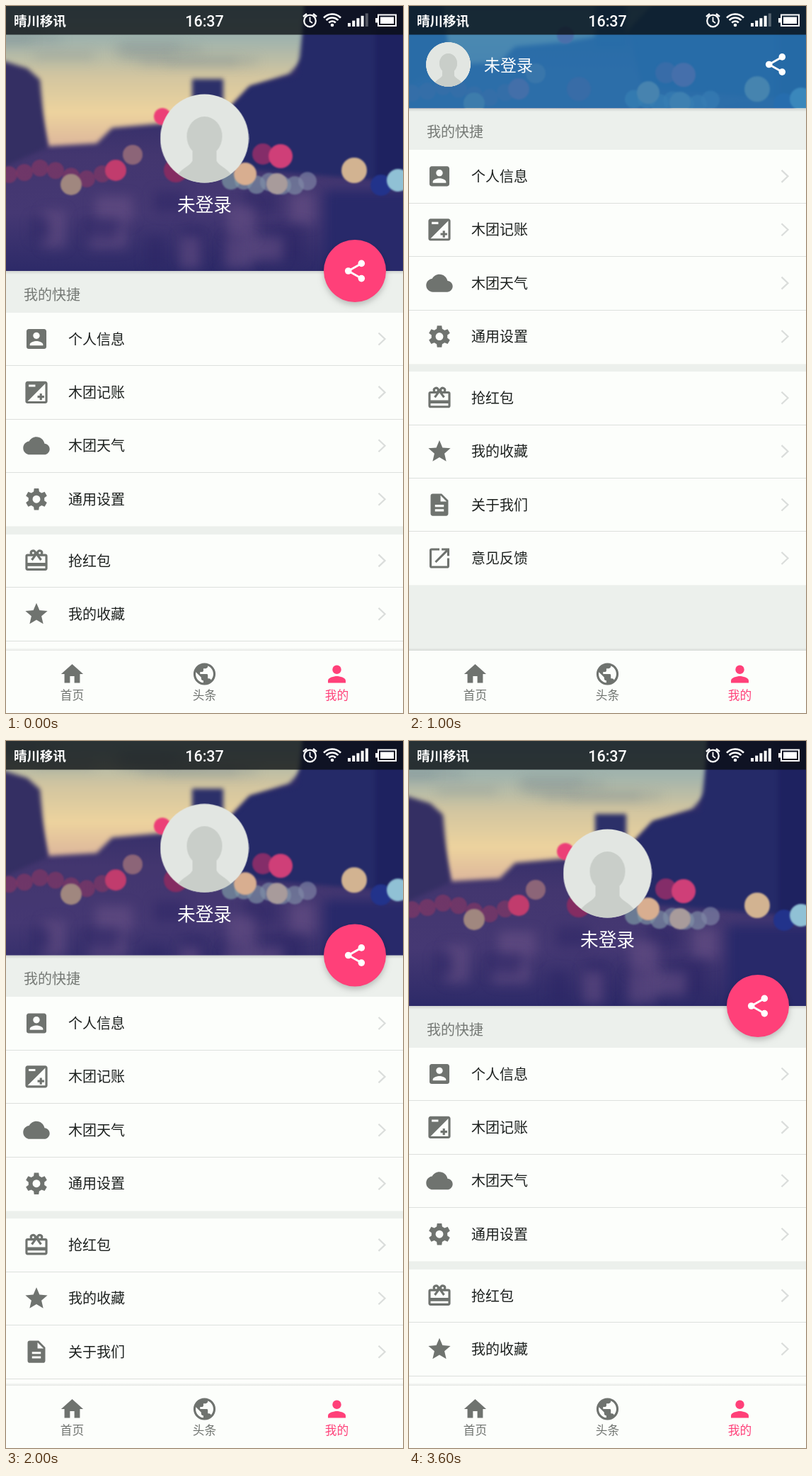
Write an HTML page with a canvas that moves like this. It is 561x998 px and loops after 3.7 s.

```html
<!DOCTYPE html>
<html lang="zh-CN">
<head>
<meta charset="utf-8">
<title>我的</title>
<style>
html, body { margin: 0; width: 100%; height: 100%; overflow: hidden; background: #ecf0ec; }
canvas { display: block; }
</style>
</head>
<body>
<canvas id="stage" width="561" height="998"></canvas>
<script>
const W = 561, FULL = 374, MIN = 126, TRIGGER = 212, LOOP = 3700, STEP = 100, TAU = Math.PI * 2;
const PINK = '#ff4079', GREY = '#6f736f', PAPER = '#fcfefb', BACK = '#ecf0ec';
const CJK = '"Noto Sans CJK SC", "Noto Sans CJK", sans-serif';
const ctx = document.getElementById('stage').getContext('2d');

const ICONS = {
  account: 'M3 5v14c0 1.1.89 2 2 2h14c1.1 0 2-.9 2-2V5c0-1.1-.9-2-2-2H5c-1.11 0-2 .9-2 2zm12 4c0 1.66-1.34 3-3 3s-3-1.34-3-3 1.34-3 3-3 3 1.34 3 3zm-9 8c0-2 4-3.1 6-3.1s6 1.1 6 3.1v1H6v-1z',
  exposure: 'M15 17v2h2v-2h2v-2h-2v-2h-2v2h-2v2h2zm5-15H4c-1.1 0-2 .9-2 2v16c0 1.1.9 2 2 2h16c1.1 0 2-.9 2-2V4c0-1.1-.9-2-2-2zM5 5h6v2H5V5zm15 15H4L20 4v16z',
  cloud: 'M19.35 10.04C18.67 6.59 15.64 4 12 4 9.11 4 6.6 5.64 5.35 8.04 2.34 8.36 0 10.91 0 14c0 3.31 2.69 6 6 6h13c2.76 0 5-2.24 5-5 0-2.64-2.05-4.78-4.65-4.96z',
  gift: 'M20 6h-2.18A3 3 0 0 0 12.5 3.35l-.5.67-.5-.68A3 3 0 0 0 6.18 6H4a2 2 0 0 0-2 2v11a2 2 0 0 0 2 2h16a2 2 0 0 0 2-2V8a2 2 0 0 0-2-2zm-5-2a1 1 0 1 1 0 2 1 1 0 0 1 0-2zM9 4a1 1 0 1 1 0 2 1 1 0 0 1 0-2zm11 15H4v-2h16v2zm0-5H4V8h5.08L7 10.83 8.62 12 12 7.4 15.38 12 17 10.83 14.92 8H20v6z',
  star: 'M12 17.27L18.18 21l-1.64-7.03L22 9.24l-7.19-.61L12 2 9.19 8.63 2 9.24l5.46 4.73L5.82 21z',
  page: 'M14 2H6a2 2 0 0 0-2 2v16a2 2 0 0 0 2 2h12a2 2 0 0 0 2-2V8l-6-6zm2 16H8v-2h8v2zm0-4H8v-2h8v2zm-3-5V3.5L18.5 9H13z',
  open: 'M19 19H5V5h7V3H5a2 2 0 0 0-2 2v14a2 2 0 0 0 2 2h14a2 2 0 0 0 2-2v-7h-2v7zM14 3v2h3.59l-9.83 9.83 1.41 1.41L19 6.41V10h2V3h-7z',
  home: 'M10 20v-6h4v6h5v-8h3L12 3 2 12h3v8z',
  globe: 'M12 2a10 10 0 1 0 0 20 10 10 0 0 0 0-20zm-1 17.93c-3.95-.49-7-3.85-7-7.93 0-.62.08-1.21.21-1.79L9 15v1c0 1.1.9 2 2 2v1.93zm6.9-2.54c-.26-.81-1-1.39-1.9-1.39h-1v-3c0-.55-.45-1-1-1H8v-2h2c.55 0 1-.45 1-1V7h2c1.1 0 2-.9 2-2v-.41c2.93 1.19 5 4.06 5 7.41 0 2.08-.8 3.97-2.1 5.39z',
  person: 'M12 12a4 4 0 1 0 0-8 4 4 0 0 0 0 8zm0 2c-2.67 0-8 1.34-8 4v2h16v-2c0-2.66-5.33-4-8-4z'
};
for (const k in ICONS) ICONS[k] = new Path2D(ICONS[k]);
ICONS.gear = gear();

const ROWS = [
  ['account', '个人信息'], ['exposure', '木团记账'], ['cloud', '木团天气'], ['gear', '通用设置'],
  ['gift', '抢红包'], ['star', '我的收藏'], ['page', '关于我们'], ['open', '意见反馈']
];

const SWIPES = [
  { start: 50, end: 480, to: MIN },
  { start: 950, end: 1250, to: FULL },
  { start: 1835, end: 2300, to: MIN },
  { start: 2350, end: 2850, to: FULL }
];

const clamp = x => Math.min(1, Math.max(0, x));
const mix = (a, b, k) => a + (b - a) * k;
const smooth = x => (x = clamp(x), x * x * (3 - 2 * x));
const unsmooth = y => .5 - Math.sin(Math.asin(1 - 2 * y) / 3);

// the moment each swipe carries the header edge past the trigger height
for (const s of SWIPES) {
  const from = FULL + MIN - s.to;
  s.cross = mix(s.start, s.end, unsmooth((TRIGGER - from) / (s.to - from)));
}

function headerBottom(t) {
  return SWIPES.reduce((h, s) => mix(h, s.to, smooth((t - s.start) / (s.end - s.start))), FULL);
}

// 0 = expanded look, 1 = collapsed look
function collapsed(t, inMs, outMs) {
  return SWIPES.reduce((k, s) => s.to === MIN
    ? mix(k, 1, clamp((t - s.cross) / inMs))
    : mix(k, 0, clamp((t - s.cross) / outMs)), 0);
}

function stateAt(t) {
  const k = collapsed(t, 420, 700);
  const last = SWIPES.filter(s => t >= s.cross).pop();
  return {
    bottom: headerBottom(t),
    scrim: .82 * smooth(k),
    face: 1 - smooth(k),
    bar: last && last.to === FULL ? k ** 2.5 : k,
    fab: 1 - collapsed(t, 200, 200)
  };
}

function gear() {
  const p = new Path2D();
  for (let i = 0; i < 6; i++) {
    for (const [d, r] of [[-20, 7.3], [-12, 10], [12, 10], [20, 7.3]]) {
      const a = (i * 60 + 30 + d) * TAU / 360;
      p.lineTo(12 + r * Math.cos(a), 12 + r * Math.sin(a));
    }
  }
  p.closePath();
  p.moveTo(15.5, 12);
  p.arc(12, 12, 3.5, 0, TAU);
  return p;
}

function icon(name, x, y, color) {
  ctx.save();
  ctx.translate(x, y);
  ctx.scale(1.56, 1.56);
  ctx.translate(-12, -12);
  ctx.fillStyle = color;
  ctx.fill(ICONS[name], 'evenodd');
  ctx.restore();
}

function text(s, x, y, size, color, align = 'left', weight = 400) {
  ctx.font = `${weight} ${size}px ${CJK}`;
  ctx.textAlign = align;
  ctx.fillStyle = color;
  ctx.fillText(s, x, y + size * .38);
}

function disc(c, x, y, r, color) {
  c.fillStyle = color;
  c.beginPath();
  c.arc(x, y, r, 0, TAU);
  c.fill();
}

function rect(c, x, y, w, h, color) {
  c.fillStyle = color;
  c.fillRect(x, y, w, h);
}

function line(points, color, width) {
  ctx.strokeStyle = color;
  ctx.lineWidth = width;
  ctx.beginPath();
  points.forEach(p => ctx.lineTo(...p));
  ctx.stroke();
}

function poly(c, points, color) {
  c.fillStyle = color;
  c.beginPath();
  points.forEach(p => c.lineTo(...p));
  c.fill();
}

function fade(y0, y1, ...stops) {
  const g = ctx.createLinearGradient(0, y0, 0, y1);
  stops.forEach((s, i) => g.addColorStop(i / (stops.length - 1), s));
  return g;
}

function layer(w, h, paint) {
  const cv = document.createElement('canvas');
  cv.width = w;
  cv.height = h;
  paint(cv.getContext('2d'));
  return cv;
}

function random(seed) {
  return (a = 0, b = 1) => {
    seed = (seed * 16807) % 2147483647;
    return mix(a, b, seed / 2147483647);
  };
}

const photo = layer(W, FULL, c => {
  const rnd = random(41);
  rect(c, 0, 0, W, FULL, fade(130, FULL, '#2f2c68', '#43366f', '#453873', '#2d2a68'));
  c.filter = 'blur(3px)';
  poly(c, [[-9, -9], [422, -9], [422, 72], [400, 96], [345, 114], [310, 150], [218, 166], [150, 172],
    [128, 194], [60, 198], [40, 120], [-9, 110]],
    fade(0, 200, '#8fadb3', '#a3b4ac', '#d3c6a0', '#edd39e', '#dcb59b'));
  poly(c, [[-9, 76], [30, 88], [48, 104], [57, 200], [-9, 230]], '#342f63');
  rect(c, 263, 103, 44, 70, '#2c3069');
  poly(c, [[425, -9], [580, -9], [580, 250], [330, 230], [312, 150], [345, 114], [412, 98]], '#252a68');
  rect(c, 522, -9, 60, 260, '#1e2260');

  // cloud streaks, then soft reflections on the ground
  c.filter = 'blur(8px)';
  for (let i = 0; i < 9; i++) rect(c, rnd(-60, 250), rnd(15, 85), rnd(60, 140), 9, 'rgba(110,125,135,.3)');
  for (let i = 0; i < 16; i++) {
    rect(c, rnd(20, 410), rnd(255, 330), rnd(25, 55), rnd(25, 55), i % 2 ? 'rgba(112,86,138,.5)' : 'rgba(42,36,100,.5)');
  }
  rect(c, 450, 260, 130, 130, '#28296a');

  c.filter = 'blur(1.2px)';
  for (let x = 4; x < 150; x += 22) disc(c, x, rnd(228, 246), 12, 'rgba(140,55,98,.6)');
  for (let x = 318; x < 430; x += 18) disc(c, x, rnd(246, 254), 13, `hsla(${rnd(190, 250)},18%,58%,.65)`);
  const lights = [
    [155, 232, 15, '#c13c6d'], [179, 210, 14, '#8c6578'], [92, 252, 15, '#a0877f'], [221, 156, 12, '#ec3f77'],
    [240, 232, 17, '#842c62'], [363, 209, 15, '#842d69'], [388, 212, 17, '#cf3f78'], [338, 237, 16, '#d8ae90'],
    [383, 251, 15, '#a89b9b'], [492, 232, 18, '#d2b391'], [530, 253, 15, '#22338b'], [554, 246, 16, '#90c1d5']
  ];
  for (const light of lights) disc(c, ...light);
});

const face = layer(126, 126, c => {
  c.translate(63, 63);
  disc(c, 0, 0, 62.5, '#e2e6e2');
  c.clip();
  c.fillStyle = '#c9cec9';
  c.beginPath();
  c.ellipse(0, -3, 25, 28, 0, 0, TAU);
  c.fill();
  c.fillRect(-17, 10, 34, 30);
  c.beginPath();
  c.moveTo(-42, 65);
  c.bezierCurveTo(-40, 40, -18, 42, -16, 28);
  c.lineTo(16, 28);
  c.bezierCurveTo(18, 42, 40, 40, 42, 65);
  c.fill();
});

function avatar(x, y, size) {
  ctx.drawImage(face, x - size / 2, y - size / 2, size, size);
}

function share(x, y) {
  const nodes = [[x + 9.3, y - 10.6], [x - 9.3, y], [x + 9.3, y + 10.6]];
  line(nodes, '#fff', 2.9);
  nodes.forEach(n => disc(ctx, ...n, 4.8, '#fff'));
}

function list(bottom) {
  text('我的快捷', 25, bottom + 33, 20, '#757975');
  ROWS.forEach(([name, label], i) => {
    const top = bottom + 59 + i * 75.4 + (i > 3 ? 11.3 : 0), y = top + 37;
    rect(ctx, 0, Math.round(top), W, 75.4, PAPER);
    if (i % 4) rect(ctx, 0, Math.round(top) - 1, W, 1, '#dde0dd');
    icon(name, 43, y, GREY);
    text(label, 88, y, 20, '#1d211f');
    line([[526.5, y - 8.5], [535.5, y], [526.5, y + 8.5]], '#dadddb', 2.2);
  });
}

function header(s) {
  const shift = (FULL - s.bottom) / 2;
  rect(ctx, 0, s.bottom, W, 5, fade(s.bottom, s.bottom + 5, 'rgba(0,0,0,.12)', 'rgba(0,0,0,0)'));
  ctx.save();
  ctx.beginPath();
  ctx.rect(0, 0, W, s.bottom);
  ctx.clip();
  ctx.drawImage(photo, 0, -shift);
  rect(ctx, 0, 0, W, s.bottom, `rgba(40,122,182,${s.scrim})`);
  ctx.globalAlpha = s.face;
  avatar(280.5, 187 - shift, 126);
  text('未登录', 280.5, 280 - shift, 25.7, '#fff', 'center');
  ctx.globalAlpha = s.bar;
  avatar(55.5, 82.5, 63.5);
  text('未登录', 106, 83, 23, '#fff');
  share(518, 82.5);
  ctx.restore();
}

function fab(bottom, k) {
  if (k <= 0) return;
  ctx.save();
  ctx.translate(493, bottom);
  ctx.scale(k, k);
  ctx.globalAlpha = k;
  ctx.shadowColor = 'rgba(0,0,0,.22)';
  ctx.shadowBlur = 9;
  ctx.shadowOffsetY = 4;
  disc(ctx, 0, 0, 44, PINK);
  ctx.shadowColor = 'transparent';
  share(0, 0);
  ctx.restore();
}

function statusBar(t) {
  rect(ctx, 0, 0, W, 40.5, 'rgba(8,12,16,.77)');
  text('晴川移讯', 11, 20.5, 18.5, '#fff', 'left', 700);
  ctx.font = '500 21.5px Roboto, sans-serif';
  ctx.textAlign = 'center';
  ctx.fillText('16:37', 280.5, 28.5);

  ctx.strokeStyle = '#fff';
  ctx.lineWidth = 2.2;
  ctx.beginPath();
  ctx.arc(429.5, 21, 8.3, 0, TAU);
  ctx.stroke();
  line([[429.5, 15.5], [429.5, 21.5], [433, 24]], '#fff', 1.8);
  line([[420, 15], [425, 11]], '#fff', 2.4);
  line([[434, 11], [439, 15]], '#fff', 2.4);

  ctx.lineWidth = 2.6;
  for (const r of [6.5, 11.5, 16.5]) {
    ctx.beginPath();
    ctx.arc(461, 28, r, -TAU * .38, -TAU * .12);
    ctx.stroke();
  }
  disc(ctx, 461, 27, 2.3, '#fff');

  for (let i = 0; i < 5; i++) {
    const h = 5 + i * 3.4;
    rect(ctx, 483 + i * 6.2, 29 - h, 4, h, i === 4 && t < 1600 ? 'rgba(255,255,255,.3)' : '#fff');
  }
  ctx.lineWidth = 2;
  ctx.strokeRect(526, 12.5, 25, 15.5);
  rect(ctx, 529, 15.5, 19, 9.5, '#fff');
  rect(ctx, 522, 17, 3, 6.5, '#fff');
}

function tabs() {
  rect(ctx, 0, 906, W, 4, fade(906, 910, 'rgba(0,0,0,0)', 'rgba(0,0,0,.09)'));
  rect(ctx, 0, 910, W, 88, PAPER);
  [['home', '首页'], ['globe', '头条'], ['person', '我的']].forEach(([name, label], i) => {
    const x = 93.5 + i * 187, color = i === 2 ? PINK : GREY;
    icon(name, x, 943, color);
    text(label, x, 973, 16.7, color, 'center');
  });
}

function draw(t) {
  const s = stateAt(t);
  rect(ctx, 0, 0, W, 998, BACK);
  list(s.bottom);
  header(s);
  fab(s.bottom, s.fab);
  statusBar(t);
  tabs();
}

const start = performance.now();
function tick() {
  const t = (performance.now() - start) % LOOP;
  draw(Math.floor(t / STEP) * STEP);
  requestAnimationFrame(tick);
}
tick();
</script>
</body>
</html>
```
